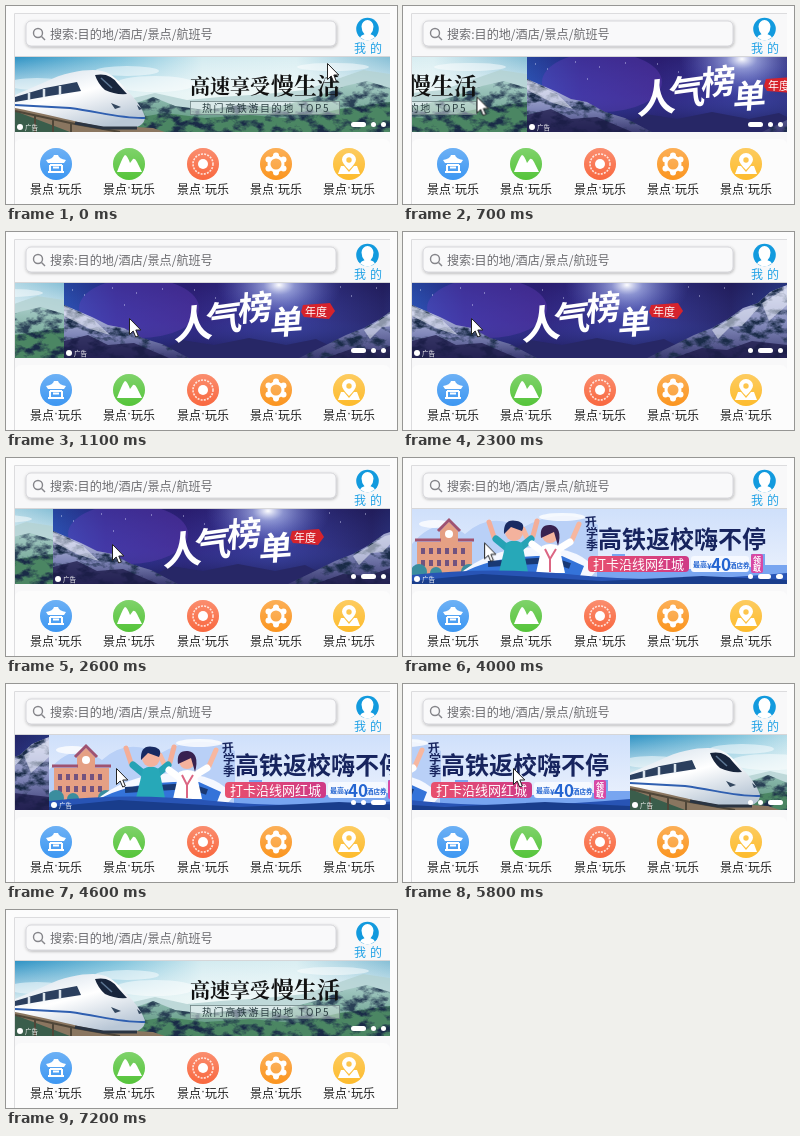
Recreate the animation shown at these times as an HTML page. Size 391 px wide and 198 px high, loop 7.4 s.

```html
<!DOCTYPE html>
<html lang="zh-CN">
<head>
<meta charset="utf-8">
<title>轮播</title>
<style>
  html, body { margin: 0; width: 100%; height: 100%; overflow: hidden; background: #fcfcfc; }
  svg { position: absolute; left: 0; top: 0; display: block; }
  text { font-family: "Noto Sans CJK SC", "Noto Sans CJK", sans-serif; white-space: pre; }
  .serif { font-family: "Noto Serif CJK SC", "Noto Serif", serif; font-weight: 900; }
  .brush { font-weight: 900; fill: #fff; }
  .dots { position: absolute; left: 345px; top: 116px; display: flex; gap: 5px; }
  .dots i { width: 5px; height: 5px; border-radius: 3px; background: #fff; }
</style>
</head>
<body>
<svg width="391" height="198" viewBox="0 0 391 198">
  <defs>
    <linearGradient id="sky" x2="1" y2="0">
      <stop stop-color="#2f93c4"/><stop offset=".28" stop-color="#7fc3dc"/><stop offset=".5" stop-color="#d3ebf0"/>
      <stop offset=".75" stop-color="#d9eef2"/><stop offset="1" stop-color="#86bfd6"/>
    </linearGradient>
    <linearGradient id="mist" x2="0" y2="1">
      <stop stop-color="#fff" stop-opacity="0"/><stop offset=".6" stop-color="#f3faf8" stop-opacity=".8"/>
    </linearGradient>
    <linearGradient id="hill" x2="0" y2="1"><stop stop-color="#a3c9c4"/><stop offset=".5" stop-color="#74a896"/><stop offset="1" stop-color="#3f7d5c"/></linearGradient>
    <linearGradient id="body" x2=".6" y2="1"><stop stop-color="#cfdce8"/><stop offset=".5" stop-color="#fff"/><stop offset="1" stop-color="#b9c7d6"/></linearGradient>
    <linearGradient id="night" x2="1" y2="0">
      <stop stop-color="#2b56b8"/><stop offset=".14" stop-color="#2c2f92"/><stop offset=".35" stop-color="#30207a"/>
      <stop offset=".6" stop-color="#3a3c98"/><stop offset=".85" stop-color="#25205f"/><stop offset="1" stop-color="#2c3f8c"/>
    </linearGradient>
    <linearGradient id="dusk" x2="0" y2="1">
      <stop stop-color="#14104a" stop-opacity=".25"/><stop offset=".5" stop-color="#3a50b4" stop-opacity=".15"/><stop offset="1" stop-color="#15123f" stop-opacity=".9"/>
    </linearGradient>
    <linearGradient id="snow" x2="0" y2="1"><stop stop-color="#c9cde8"/><stop offset=".55" stop-color="#8289ba"/><stop offset="1" stop-color="#3a3a72"/></linearGradient>
    <radialGradient id="glow"><stop stop-color="#fff"/><stop offset=".25" stop-color="#c6d2ff" stop-opacity=".6"/><stop offset="1" stop-color="#6d78e0" stop-opacity="0"/></radialGradient>
    <linearGradient id="day" x2="0" y2="1"><stop stop-color="#cfe0fb"/><stop offset="1" stop-color="#eef3fd"/></linearGradient>
    <linearGradient id="pink" x2="1" y2="0"><stop stop-color="#e8506e"/><stop offset="1" stop-color="#cf3a86"/></linearGradient>
    <linearGradient id="shine" x2="0" y2="1"><stop stop-color="#fff" stop-opacity=".25"/><stop offset="1" stop-color="#fff" stop-opacity="0"/></linearGradient>
    <filter id="shadow" x="-5%" y="-30%" width="110%" height="170%"><feDropShadow dx=".5" dy="1" stdDeviation="1.5" flood-opacity=".3"/></filter>
    <filter id="rough" x="0" y="0" width="100%" height="100%" color-interpolation-filters="sRGB">
      <feTurbulence type="fractalNoise" baseFrequency=".07 .11" numOctaves="4" seed="7"/>
      <feColorMatrix values="0 0 0 0 .1  0 0 0 0 .17  0 0 0 0 .28  4 0 0 0 -1.8"/>
      <feComposite in2="SourceGraphic" operator="in" result="shade"/>
      <feMerge><feMergeNode in="SourceGraphic"/><feMergeNode in="shade"/></feMerge>
    </filter>
    <clipPath id="view"><rect x="9" y="51" width="375" height="75"/></clipPath>
    <clipPath id="slide"><rect width="375" height="75"/></clipPath>

    <g id="ad">
      <circle cx="5" cy="70" r="3" fill="#fff"/>
      <text x="10" y="73" font-size="6.5" fill="#fff">广告</text>
    </g>

    <g id="train" clip-path="url(#slide)">
      <rect width="375" height="75" fill="url(#sky)"/>
      <rect width="375" height="60" fill="url(#mist)"/>
      <g fill="#fff" opacity=".5">
        <ellipse cx="22" cy="27" rx="30" ry="6"/><ellipse cx="112" cy="14" rx="32" ry="5"/>
        <ellipse cx="140" cy="27" rx="40" ry="8"/><ellipse cx="318" cy="10" rx="36" ry="4"/>
      </g>
      <path d="M105 44 140 36 172 43 205 40 250 37 290 33 322 22 348 13 375 17V75H105Z" fill="#b4d3d2" opacity=".8"/>
      <g filter="url(#rough)">
        <path d="M110 50 138 40 160 49 190 53 225 48 262 50 300 40 330 29 352 24 375 31V75H110Z" fill="url(#hill)" opacity=".85"/>
        <path d="M120 61 150 56 190 61 235 58 280 62 325 52 375 45V75H120Z" fill="#4b8663"/>
        <path d="M0 45 14 41 28 46 40 50V75H0Z" fill="#2f6555"/>
      </g>
      <path d="M0 49 60 62 120 70 138 71 150 75H0Z" fill="#8a7660"/>
      <path d="M0 54 55 75H0Z" fill="#3a5d4b"/>
      <path d="M0 54 60 67 105 75M20 58V75M38 62V75M56 67V75" stroke="#4f4638" stroke-width="2" fill="none"/>
      <path d="M0 38 30 25C48 16 65 13 78 13 91 13 98 18 107 28 119 40 127 50 130 60 130 68 122 72 108 72 82 71 50 61 0 51Z" fill="url(#body)"/>
      <path d="M0 40 30 31 62 25 66 34 34 39 0 45Z" fill="#2b3f5e"/>
      <path d="M14 36V43M29 32V40M45 29V38" stroke="#dbe4ec" stroke-width="2.5"/>
      <path d="M0 48 55 51C85 55 108 62 130 61" stroke="#2f5fb0" stroke-width="2" fill="none"/>
      <path d="M80 18Q95 15 103 27L112 37Q100 38 90 33 83 27 80 18Z" fill="#18253c"/>
      <path d="M86 21 97 31" stroke="#5d7794" stroke-width="1.500"/>
      <path d="M96 46 106 50 100 52ZM122 48 127 52 124 53Z" fill="#33475f"/>
      <path d="M60 66 88 71 122 71" stroke="#2a3442" stroke-width="3" fill="none"/>
      <text class="serif" x="175" y="36.5" font-size="20" fill="#111">高速享受</text>
      <text class="serif" x="256" y="36.5" font-size="23" fill="#111">慢生活</text>
      <rect x="175.5" y="44.5" width="149" height="13" fill="#fff" fill-opacity=".4" stroke="#6f8485" stroke-width=".8"/>
      <text x="187" y="55" font-size="10" letter-spacing="1.6" fill="#2b3f42">热门高铁游目的地 TOP5</text>
      <use href="#ad"/>
    </g>

    <g id="peaks" clip-path="url(#slide)">
      <rect width="375" height="75" fill="url(#night)"/>
      <rect width="375" height="75" fill="url(#dusk)"/>
      <ellipse cx="75" cy="25" rx="60" ry="30" fill="#6a3fc0" opacity=".35"/>
      <ellipse cx="215" cy="2" rx="62" ry="40" fill="url(#glow)"/>
      <path d="M20 12h1M72 10h1M98 6h1M130 7h1M151 15h1M60 22h1M48 5h1M287 13h1M312 5h1M340 11h1M276 4h1M8 7h1" stroke="#dfe3ff" opacity=".8"/>
      <path d="M85 75 118 57 150 62 185 55 222 62 252 56 290 75Z" fill="#272766"/>
      <g filter="url(#rough)">
        <path d="M0 22 14 28 28 34 44 42 60 45 78 55 98 61 125 75H0Z" fill="url(#snow)"/>
        <path d="M235 75 262 62 282 52 300 45 316 36 331 25 346 20 358 9 375 2V75Z" fill="url(#snow)"/>
      </g>
      <path d="M0 58 24 52 44 62 70 60 105 75H0ZM262 75 290 65 315 67 340 58 375 62V75Z" fill="#1c1a48" opacity=".75"/>
      <path d="M0 23 30 37 46 52 26 46 0 33ZM300 47 332 27 348 23 330 43 318 44 306 56ZM350 20 375 5V22L357 38Z" fill="#eceefa" opacity=".55"/>
      <g transform="skewX(-8)">
        <text class="brush" x="116" y="55" font-size="39" transform="rotate(-6 135 40)">人</text>
        <text class="brush" x="147" y="48" font-size="36" transform="rotate(-8 165 35)">气</text>
        <text class="brush" x="178" y="37" font-size="34" transform="rotate(-5 195 25)">榜</text>
        <text class="brush" x="212" y="51" font-size="33" transform="rotate(-4 228 40)">单</text>
      </g>
      <path d="M239 22 266 20 271 28 265 36 240 34 237 29Z" fill="#d6232c"/>
      <text x="241" y="32.5" font-size="11" font-weight="500" fill="#fff">年度</text>
      <use href="#ad"/>
    </g>

    <g id="school" clip-path="url(#slide)">
      <rect width="375" height="75" fill="url(#day)"/>
      <path d="M0 35Q25 5 53 25 78 2 110 19 150-4 186 16V75H0Z" fill="#b9d0f7"/>
      <g fill="#fff" opacity=".8"><ellipse cx="23" cy="15" rx="16" ry="4"/><ellipse cx="150" cy="8" rx="23" ry="4"/></g>
      <path d="M185 75V52h15v-7h13v13h22V48h18v12h45V47h16v11h25V45h14v11h22V75Z" fill="#78a5f0"/>
      <path d="M5 33H28V22L37 13 46 22V33H60V70H5Z" fill="#e5a084"/>
      <path d="M3 31H29M46 31H62M26 22 37 11 48 22" stroke="#9f5271" stroke-width="3" fill="none"/>
      <circle cx="37" cy="25" r="4" fill="#fff"/>
      <path d="M9 42H57M9 54H57" stroke="#71537f" stroke-width="6" stroke-dasharray="4 4"/>
      <g fill="#3a8d9e"><circle cx="7" cy="63" r="8"/><circle cx="24" cy="64" r="6"/><circle cx="57" cy="63" r="8"/></g>
      <path d="M44 68Q75 39 126 38 171 39 184 62L178 69Z" fill="#f5f8ff"/>
      <path d="M54 62Q88 45 150 47L172 57 168 67H48Z" fill="#3473d9"/>
      <path d="M76 55 140 51 158 57" stroke="#193974" stroke-width="6" fill="none"/>
      <g fill="none" stroke-linecap="round">
        <path d="M96 39 82 28 77 13M108 39 121 27 125 12" stroke="#f4ae98" stroke-width="5"/>
        <path d="M131 43 117 33 111 20M145 41 160 31 167 15" stroke="#f7b7a0" stroke-width="5"/>
        <path d="M95 39 84 30M108 39 119 30" stroke="#26a2b5" stroke-width="7"/>
        <path d="M131 43 120 35M145 41 158 33" stroke="#fff" stroke-width="7"/>
      </g>
      <path d="M94 34Q102 29 110 34L116 63H87Z" fill="#27a8b8"/>
      <path d="M130 37Q138 33 147 37L153 64H124Z" fill="#fff"/>
      <path d="M133 40 138 50 144 40M138 50V63" stroke="#dc6683" stroke-width="2" fill="none"/>
      <g fill="#f4b29d"><circle cx="102" cy="23" r="9"/><circle cx="138" cy="26" r="8"/></g>
      <path d="M92 25Q91 9 105 12 114 14 110 22L99 18Z" fill="#182a62"/>
      <path d="M129 29Q127 15 139 16 151 18 146 37L142 23Z" fill="#372150"/>
      <path d="M0 66Q80 57 165 66T375 64V75H0Z" fill="#2854b5"/>
      <path d="M0 72 70 65 190 72 290 67 375 71V75H0Z" fill="#193d8c"/>
      <g font-weight="900" fill="#17245e">
        <text x="173" y="17" font-size="12" transform="rotate(-5 179 14)">开</text>
        <text x="174" y="29" font-size="12">学</text>
        <text x="174" y="41" font-size="12">季</text>
        <text x="186" y="39" font-size="24">高铁返校嗨不停</text>
      </g>
      <rect x="176" y="47" width="101" height="16" rx="4" fill="url(#pink)"/>
      <text x="181" y="60" font-size="13" font-weight="500" fill="#fff">打卡沿线网红城</text>
      <rect x="279" y="47" width="58" height="16" rx="3" fill="#f6f9ff"/>
      <g fill="#2364d1" font-weight="700">
        <text x="281" y="58" font-size="7">最高</text>
        <text x="295" y="60" font-size="8">¥</text>
        <text x="299" y="61.5" font-size="17">40</text>
        <text x="318" y="59" font-size="6.5">酒店券</text>
      </g>
      <rect x="339" y="45" width="12" height="19" rx="2" fill="#d848a5"/>
      <g font-size="8" font-weight="700" fill="#fff"><text x="341" y="53.5">领</text><text x="341" y="62">取</text></g>
      <use href="#ad"/>
    </g>

    <g id="label">
      <circle r="16" cy="-26" fill="url(#shine)"/>
      <text x="-26" y="4" font-size="12" fill="#222">景点<tspan font-family="Liberation Sans, sans-serif" dy="-3">·</tspan><tspan dy="3">玩乐</tspan></text>
    </g>
  </defs>

  <rect x="9" y="8" width="375" height="190" fill="#f8f8f9"/>
  <path d="M8.5 198V7.5H384" fill="none" stroke="#dcdcde"/>
  <path d="M9 50.5H384" stroke="#d6d6d8"/>

  <rect x="20" y="15" width="310" height="25" rx="5" fill="#f9f9fa" stroke="#cfcfd3" stroke-width=".8" filter="url(#shadow)"/>
  <g fill="none" stroke="#85858a" stroke-width="1.4"><circle cx="32" cy="27" r="4.5"/><path d="M35.5 30.5 39 34"/></g>
  <text x="44" y="32.5" font-size="12.1" fill="#6c6c70">搜索:目的地/酒店/景点/航班号</text>

  <circle cx="361.5" cy="23" r="11.3" fill="#129ade"/>
  <path d="M354 31.500Q355 29 358.500 28.200 355.500 25 355.500 20.500A6 6.500 0 0 1 367.500 20.500Q367.500 25 364.500 28.200 368 29 369 31.500 361.500 37 354 31.500Z" fill="#fff"/>
  <text x="348" y="47" font-size="12" font-weight="500" letter-spacing="4" fill="#22a2e6">我的</text>

  <g clip-path="url(#view)">
    <g id="strip">
      <use href="#train" x="9" y="51"/>
      <use href="#peaks" x="384" y="51"/>
      <use href="#school" x="759" y="51"/>
      <use href="#train" x="1134" y="51"/>
    </g>
  </g>

  <rect x="9" y="133" width="375" height="75" rx="6" fill="#fcfcfc"/>
  <g>
    <circle cx="50" cy="158" r="16" fill="#3d97f2"/>
    <circle cx="123" cy="158" r="16" fill="#55c43a"/>
    <circle cx="197" cy="158" r="16" fill="#f9683f"/>
    <circle cx="270" cy="158" r="16" fill="#fb951f"/>
    <circle cx="343" cy="158" r="16" fill="#fdbb2c"/>
  </g>
  <circle cx="197" cy="158" r="10" fill="none" stroke="#fff" stroke-width="1.6" stroke-dasharray="2 1.2" opacity=".8"/>
  <path d="M44 159V166M56 159V166M47 161.500H53M42 166H58" fill="none" stroke="#fff" stroke-width="2"/>
  <g fill="#fff">
    <path d="M40 154Q47 153 48 149H52Q53 153 60 154L58 157H42ZM44 158H56V160H44Z"/>
    <path d="M111 166Q117 150 119 149 121 149 124 157L127 153Q129 152 131 156L136 166Z"/>
    <circle cx="197" cy="158" r="5"/>
    <g id="petals">
      <circle cx="270" cy="149.500" r="3"/><circle cx="270" cy="166.500" r="3"/>
      <circle cx="262.500" cy="153.500" r="3"/><circle cx="277.500" cy="153.500" r="3"/>
      <circle cx="262.500" cy="162.500" r="3"/><circle cx="277.500" cy="162.500" r="3"/>
      <circle cx="270" cy="158" r="8.500"/>
    </g>
    <path d="M343 164Q336 157 336 153.500A7 6.500 0 0 1 350 153.500Q350 157 343 164Z"/>
    <path d="M332 168 335 160 338 160 343 166 348 160H351L354 168Z"/>
  </g>
  <circle cx="270" cy="158" r="5.500" fill="#fb9f35"/>
  <circle cx="343" cy="154" r="2.700" fill="#fdbb2c"/>
  <use href="#label" x="50" y="184"/>
  <use href="#label" x="123" y="184"/>
  <use href="#label" x="197" y="184"/>
  <use href="#label" x="270" y="184"/>
  <use href="#label" x="343" y="184"/>
</svg>

<div class="dots"><i></i><i></i><i></i></div>

<svg width="391" height="198" viewBox="0 0 391 198">
  <path id="cursor" d="M.5.5V16.500L4.200 13 6.700 19 9.300 18 6.800 12H11.800Z" fill="#fff" stroke="#222"/>
</svg>

<script>
const LOOP = 7400, STEP = 100;

// Each key is [ms, value, easing towards the next key].
const track = (el, prop, keys) => {
  const frames = keys.map(([ms, value, easing = 'linear']) => ({ offset: ms / LOOP, [prop]: value, easing }));
  const animation = el.animate(frames, { duration: LOOP });
  animation.pause();
  return animation;
};
const move = (el, keys) => track(el, 'transform',
  keys.map(([ms, x, y, easing]) => [ms, `translate(${x}px, ${y}px)`, easing]));

const strip = document.getElementById('strip');
const cursor = document.getElementById('cursor');
const [first, second, third] = document.querySelectorAll('.dots i');
const SMALL = '5px', WIDE = '15px';

const animations = [
  move(strip, [
    [0, 0, 0], [560, 0, 0, 'ease'], [900, -372, 0], [1100, -326, 0],
    [1650, -326, 0, 'ease'], [2150, -375, 0], [2400, -375, 0], [2600, -337, 0],
    [3445, -337, 0, 'ease'], [3945, -750, 0], [4300, -750, 0], [4600, -716, 0],
    [5799, -716, 0], [5800, -907, 0, 'ease-out'], [6160, -1125, 0], [LOOP, -1125, 0]
  ]),
  move(cursor, [
    [0, 321, 57, 'ease-in-out'], [400, 73, 93], [500, 73, 93], [900, 74, 88], [1100, 123, 86],
    [1600, 123, 86, 'ease-in-out'], [2300, 68, 86], [2400, 68, 86], [2600, 106, 86],
    [3500, 106, 86, 'ease-in-out'], [4200, 76, 84], [4300, 76, 84], [4600, 110, 84],
    [6400, 110, 84, 'ease-in'], [6600, 125, 88], [7200, 392, 25], [LOOP, 392, 25]
  ]),
  track(first, 'width', [[0, WIDE], [2000, WIDE], [2200, SMALL], [6100, SMALL], [6300, WIDE], [LOOP, WIDE]]),
  track(second, 'width', [[0, SMALL], [2000, SMALL], [2200, WIDE], [3950, WIDE], [4200, SMALL], [LOOP, SMALL]]),
  track(third, 'width', [[0, SMALL], [3950, SMALL], [4200, WIDE], [6100, WIDE], [6300, SMALL], [LOOP, SMALL]])
];

const start = performance.now();
const draw = () => {
  const time = (performance.now() - start) % LOOP;
  const held = Math.floor(time / STEP) * STEP;
  for (const animation of animations) animation.currentTime = held;
  requestAnimationFrame(draw);
};
draw();
</script>
</body>
</html>
```
